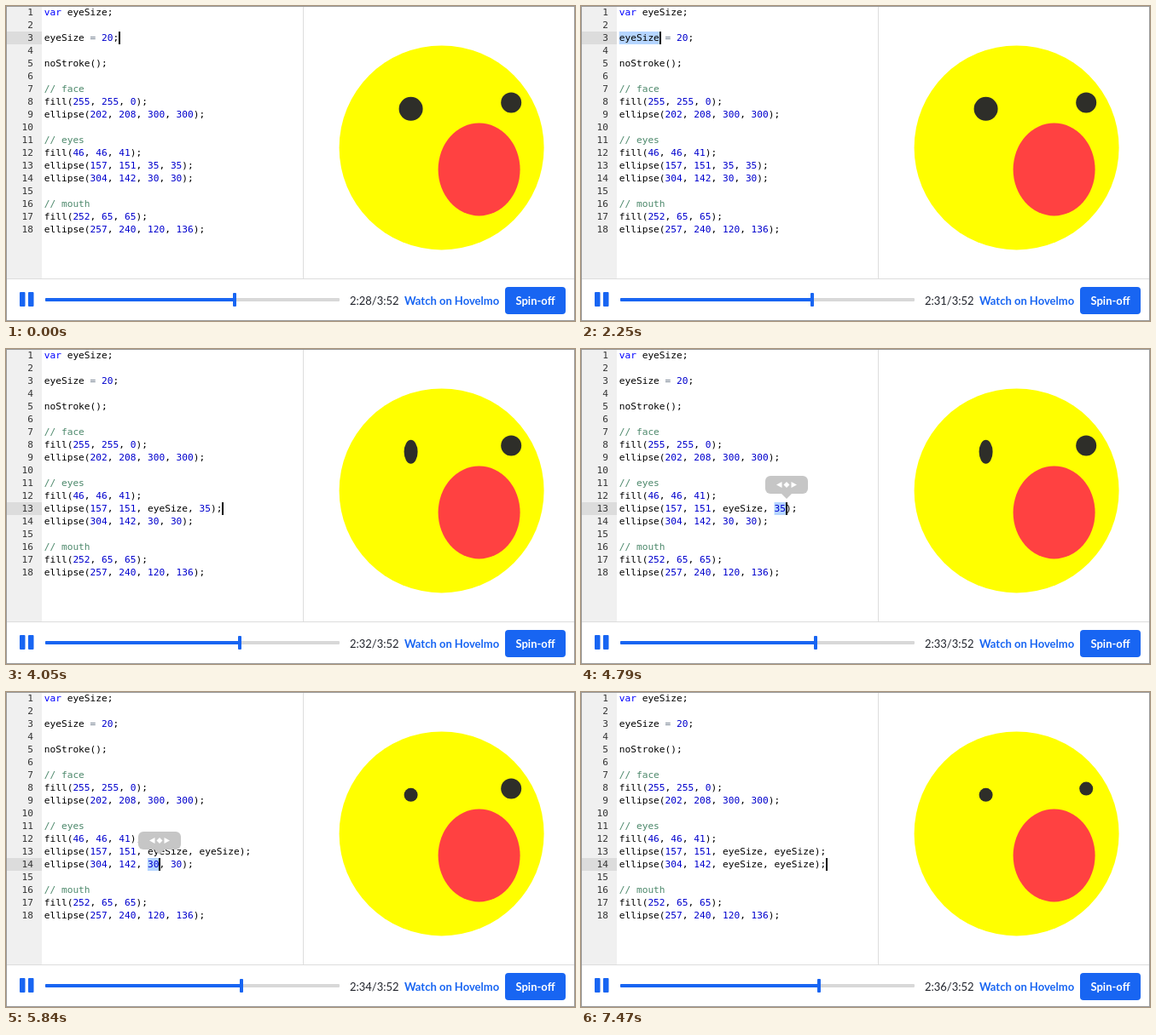
An HTML page with a canvas for the animation above (8000 ms loop, 667 by 370 pixels).

```html
<!DOCTYPE html>
<html lang="en">
<head>
<meta charset="utf-8">
<title>Code lesson player</title>
<style>
  html, body { margin: 0; width: 100%; height: 100%; overflow: hidden; background: #fff; }
  canvas { display: block; }
</style>
</head>
<body>
<canvas id="stage" width="667" height="370"></canvas>
<script>
const ctx = document.getElementById('stage').getContext('2d');
const LOOP = 8000, LINE = 15, CODE_X = 44.7;
const CODE_FONT = '11.2px "DejaVu Sans Mono", monospace';
const BLUE = '#1865f2', SELECTION = '#b5d5ff';

// Times at which the clock and the seek knob advance by one step.
const clockSteps = [300, 1350, 2250, 3300, 4340, 5240, 6290, 7330];
const knobSteps = [750, 1500, 2100, 2850, 3600, 4050, 4790, 5540, 6290, 6730, 7470];

// Editor actions: selection start is optional, the caret sits at its end.
const actions = [
  { at: 0, line: 3, caret: 13 },
  { at: 600, line: 3, caret: 7, from: 6 },
  { at: 750, line: 3, caret: 7, from: 1 },
  { at: 1350, line: 3, caret: 7, from: 0 },
  { at: 3000, line: 13, caret: 19, popup: true },
  { at: 3300, line: 13, caret: 20, from: 18, popup: true },
  { at: 4050, line: 13, caret: 31 },
  { at: 4490, line: 13, caret: 28, popup: true },
  { at: 4790, line: 13, caret: 29, from: 27, popup: true },
  { at: 5240, line: 13, caret: 34 },
  { at: 5540, line: 14, caret: 19, popup: true },
  { at: 5840, line: 14, caret: 20, from: 18, popup: true },
  { at: 6290, line: 14, caret: 31 },
  { at: 6730, line: 14, caret: 28, popup: true },
  { at: 7030, line: 14, caret: 29, from: 27, popup: true },
  { at: 7470, line: 14, caret: 36 }
];

const countPassed = (steps, t) => steps.filter(s => s <= t).length;

function rect(color, x, y, w, h, radius = 0) {
  ctx.fillStyle = color;
  ctx.beginPath();
  ctx.roundRect(x, y, w, h, radius);
  ctx.fill();
}

function polygon(color, ...points) {
  ctx.fillStyle = color;
  ctx.beginPath();
  points.forEach(([x, y]) => ctx.lineTo(x, y));
  ctx.fill();
}

function text(str, x, y, font, color, align = 'left') {
  ctx.font = font;
  ctx.fillStyle = color;
  ctx.textAlign = align;
  ctx.fillText(str, x, y);
}

function programLines(t) {
  const arg = (time, size) => t >= time ? 'eyeSize' : size;
  return [
    'var eyeSize;', '', 'eyeSize = 20;', '', 'noStroke();', '',
    '// face', 'fill(255, 255, 0);', 'ellipse(202, 208, 300, 300);', '',
    '// eyes', 'fill(46, 46, 41);',
    `ellipse(157, 151, ${arg(4050, 35)}, ${arg(5240, 35)});`,
    `ellipse(304, 142, ${arg(6290, 30)}, ${arg(7470, 30)});`, '',
    '// mouth', 'fill(252, 65, 65);', 'ellipse(257, 240, 120, 136);'
  ];
}

function tokenColor(token) {
  if (token.startsWith('//')) return '#4c886b';
  if (token === 'var') return '#0000ff';
  if (token === '=') return '#687687';
  return /^\d/.test(token) ? '#0000cd' : '#000';
}

function drawPopup(x, line) {
  const top = (line - 1) * LINE - 31, mid = top + 10.5;
  rect('#c6c6c6', x - 25, top, 50, 21, 6);
  polygon('#c6c6c6', [x - 6, top + 21], [x + 6, top + 21], [x, top + 27]);
  for (const side of [-1, 1]) {
    polygon('#fff', [x + side * 12, mid], [x + side * 5.5, mid - 3.5], [x + side * 5.5, mid + 3.5]);
  }
  polygon('#fff', [x - 3.5, mid], [x, mid - 3.5], [x + 3.5, mid], [x, mid + 3.5]);
}

function drawEditor(t, lines) {
  const { line, caret, from, popup } = actions.findLast(a => a.at <= t);
  ctx.font = CODE_FONT;
  const charWidth = ctx.measureText('0').width;
  const columnX = col => CODE_X + col * charWidth;
  const top = (line - 1) * LINE;

  rect('#f0f0f0', 1, 1, 41, 319);
  rect('#dcdcdc', 1, top, 41, LINE);
  if (from !== undefined) {
    rect(SELECTION, columnX(from), top, (caret - from) * charWidth, LINE);
  }
  lines.forEach((code, i) => {
    const y = i * LINE + 11;
    text(i + 1, 32, y, CODE_FONT, '#333', 'right');
    for (const match of code.matchAll(/\/\/.*|\w+|[^\w\s]/g)) {
      text(match[0], columnX(match.index), y, CODE_FONT, tokenColor(match[0]));
    }
  });
  const caretX = Math.round(columnX(caret));
  rect('#000', caretX, top, 2, LINE);
  if (popup) drawPopup(caretX + 1, line);
}

function drawEllipse(color, x, y, w, h) {
  const scale = 0.8;
  ctx.fillStyle = color;
  ctx.beginPath();
  ctx.ellipse(349 + x * scale, y * scale, w * scale / 2, h * scale / 2, 0, 0, Math.PI * 2);
  ctx.fill();
}

function drawFace(lines) {
  const colors = { 9: '#ff0', 13: '#2e2e29', 14: '#2e2e29', 18: '#ff4141' };
  for (const [line, color] of Object.entries(colors)) {
    const args = lines[line - 1].match(/\((.*)\)/)[1].split(', ');
    drawEllipse(color, ...args.map(a => a === 'eyeSize' ? 20 : Number(a)));
  }
}

function drawControls(t) {
  const knob = 268 + countPassed(knobSteps, t);
  const seconds = 28 + countPassed(clockSteps, t);
  const bold = 'bold 13px Lato, sans-serif';

  rect(BLUE, 16, 336, 6.5, 17, 1);
  rect(BLUE, 26, 336, 6.5, 17, 1);
  rect('#d8d8d8', 46, 343, 345, 4, 1);
  rect(BLUE, 46, 343, knob - 46, 4, 1);
  rect(BLUE, knob - 2, 337, 4, 16, 1);
  text(`2:${seconds}/3:52`, 403, 351, '13px Lato, sans-serif', '#21242c');
  text('Watch on Hovelmo', 467, 351, bold, BLUE);
  rect(BLUE, 585, 330, 71, 32, 4);
  text('Spin-off', 620.5, 351, bold, '#fff', 'center');
}

function draw(t) {
  const lines = programLines(t);
  rect('#fff', 0, 0, 667, 370);
  drawEditor(t, lines);
  drawFace(lines);
  rect('#ddd', 348, 1, 1, 319);
  rect('#ddd', 1, 320, 665, 1);
  drawControls(t);
  ctx.strokeStyle = '#999';
  ctx.strokeRect(0.5, 0.5, 666, 369);
}

const start = performance.now();
function tick() {
  draw((performance.now() - start) % LOOP);
  requestAnimationFrame(tick);
}
tick();
</script>
</body>
</html>
```
